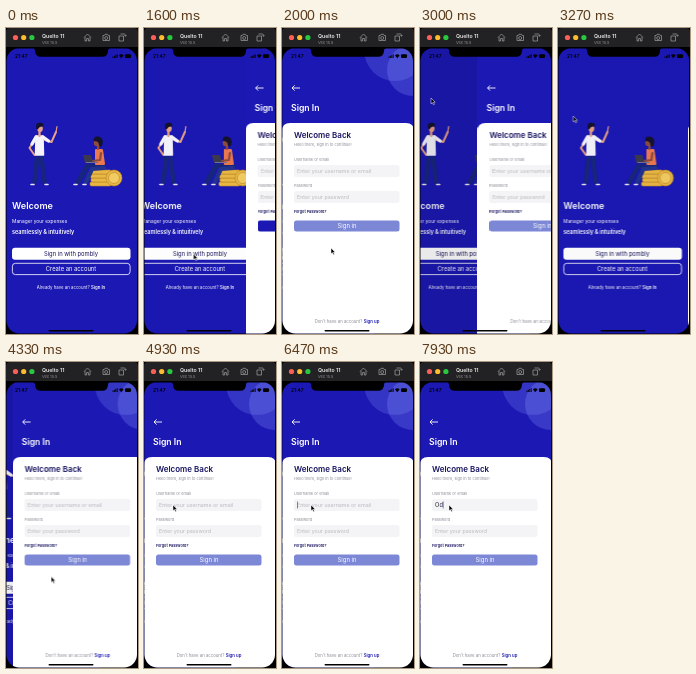
An HTML page for the animation above (8 s loop, 132 px wide and 306 px high).

```html
<!DOCTYPE html>
<html lang="en">
<head>
<meta charset="utf-8">
<title>Sign in flow</title>
<style>
  html, body { margin: 0; width: 100%; height: 100%; overflow: hidden; background: #000; }
  svg { display: block; width: 100vw; height: 100vh; font-family: Inter, "Liberation Sans", sans-serif; }
  .b { font-weight: 600; }
  .mid { text-anchor: middle; }
  .white { fill: #fff; }
  .navy { fill: #17145f; }
  .grey { fill: #8b8b96; }
  .hint { fill: #b9b9c0; font-size: 5.35px; }
  .label { fill: #8b8b96; font-size: 3.95px; }

  .welcome, .signin, .shade, .submit, .cursor, .hint-user, .typed, .caret {
    animation: 8s linear infinite;
  }
  .welcome { animation-name: parallax; }
  .signin { animation-name: push; }
  .shade { animation-name: shade; }
  .submit { animation-name: disable; }
  .cursor { animation-name: pointer; }
  .hint-user { animation-name: hint; animation-timing-function: step-end; }
  .typed { animation-name: typed; animation-timing-function: step-end; }
  .typed.second { animation-name: typed-second; }
  .caret { animation-name: caret; animation-timing-function: step-end; }

  @keyframes push {
    0%, 19.57%, 50.6% { transform: translateX(132px); animation-timing-function: cubic-bezier(.215, .61, .355, 1); }
    24.9%, 36.62% { transform: none; animation-timing-function: cubic-bezier(.215, .61, .355, 1); }
    42% { transform: translateX(132px); }
    56%, 100% { transform: none; }
  }
  @keyframes parallax {
    0%, 19.57%, 50.6% { transform: none; animation-timing-function: cubic-bezier(.215, .61, .355, 1); }
    24.9%, 36.62% { transform: translateX(-39.6px); animation-timing-function: cubic-bezier(.215, .61, .355, 1); }
    42% { transform: none; }
    56%, 100% { transform: translateX(-39.6px); }
  }
  @keyframes shade {
    0%, 19.57%, 42%, 50.6% { opacity: 0; }
    24.9%, 36.62%, 56%, 100% { opacity: .1; }
  }
  @keyframes disable {
    0%, 20.5%, 42%, 51.5% { fill: #1b18b3; }
    22%, 41.9%, 53%, 100% { fill: #7c88d5; }
  }
  @keyframes pointer {
    0%, 8% { transform: translate(86px, 310px); animation-timing-function: ease-in-out; }
    17%, 20% { transform: translate(49.5px, 226px); }
    25%, 28% { transform: translate(49px, 220px); animation-timing-function: ease-in-out; }
    34.5%, 36% { transform: translate(12px, 59px); }
    37.5%, 39% { transform: translate(11px, 70px); animation-timing-function: ease-in-out; }
    47%, 52% { transform: translate(48px, 227px); animation-timing-function: ease-in-out; }
    60%, 100% { transform: translate(29px, 143px); }
  }
  @keyframes hint { 0% { opacity: 1; } 93% { opacity: 0; } }
  @keyframes typed { 0% { opacity: 0; } 93% { opacity: 1; } }
  @keyframes typed-second { 0% { opacity: 0; } 96.5% { opacity: 1; } }
  @keyframes caret {
    0% { opacity: 0; transform: none; }
    65% { opacity: 1; transform: none; }
    71% { opacity: 0; transform: none; }
    77% { opacity: 1; transform: none; }
    83% { opacity: 0; transform: none; }
    89% { opacity: 1; transform: none; }
    93% { opacity: 1; transform: translateX(4.4px); }
    96.5% { opacity: 1; transform: translateX(7.7px); }
  }
</style>
</head>
<body>
<svg viewBox="0 0 132 306" preserveAspectRatio="none">
  <defs>
    <clipPath id="screen"><rect x=".5" y="20" width="130.5" height="285.5" rx="13"/></clipPath>
    <clipPath id="header"><rect y="18" width="132" height="90"/></clipPath>
  </defs>

  <g clip-path="url(#screen)">
    <g class="welcome">
      <rect y="18" width="132" height="288" fill="#1b18b3"/>

      <!-- standing man -->
      <g stroke-linecap="round" stroke-linejoin="round" fill="none">
        <path d="M31 130L28.5 154M35.5 130L38.5 154" stroke="#17267c" stroke-width="4.4"/>
        <path d="M28 156.5H25M39 156.5H42" stroke="#e9e5ee" stroke-width="1.6"/>
        <path d="M28 113L23.5 120L28.5 127" stroke="#e8a184" stroke-width="2"/>
        <path d="M39 112L45.5 114L50 104" stroke="#e8a184" stroke-width="2"/>
        <path d="M50 104L51 98.5" stroke="#e8a184" stroke-width="1.2"/>
        <path d="M30 109L26 116M37 109L42.5 113" stroke="#f4f2fa" stroke-width="3.4"/>
        <path d="M30 108H37L37.5 127H29.5Z" fill="#f4f2fa" stroke="#f4f2fa" stroke-width="1.5"/>
        <path d="M33.5 104V108" stroke="#e8a184" stroke-width="2.3"/>
      </g>
      <ellipse cx="34" cy="100.5" rx="2.8" ry="3.6" fill="#e8a184"/>
      <path d="M30.4 101Q29 94.5 33.5 94.7Q38.4 94.3 37.2 98.5Q33 98 32 101.5Z" fill="#12122a"/>

      <!-- coins -->
      <g fill="#e8b844" stroke="#bd8528" stroke-width=".6">
        <rect x="84" y="154" width="21" height="4" rx="1.4"/>
        <rect x="85" y="150" width="20" height="4" rx="1.4"/>
        <rect x="84" y="146" width="20" height="4" rx="1.4"/>
        <rect x="85" y="142" width="20" height="4" rx="1.4"/>
        <circle cx="108" cy="150" r="8"/>
        <circle cx="108" cy="150" r="5.5" fill="#f2cc62"/>
      </g>

      <!-- seated woman -->
      <g transform="translate(8 0)">
        <g stroke-linecap="round" stroke-linejoin="round" fill="none">
          <path d="M90 138L73 138L64 154" stroke="#17267c" stroke-width="4.6"/>
          <path d="M90 140L78 141L72 154" stroke="#22338f" stroke-width="4.2"/>
          <path d="M63 156.5H60M72 156.5H69" stroke="#e9e5ee" stroke-width="1.6"/>
          <path d="M82 122H88L90 136H82Z" fill="#eb7950" stroke="#eb7950" stroke-width="2"/>
          <path d="M87 125L86 132L78 133" stroke="#8e4c3c" stroke-width="2.2"/>
          <path d="M84 118V121" stroke="#8e4c3c" stroke-width="2.2"/>
        </g>
        <circle cx="83" cy="115" r="3.2" fill="#8e4c3c"/>
        <path d="M80 113Q79 108 84 108.5Q90 109.5 88.5 116Q87.5 121 85 117Q85 113 80 113Z" fill="#15122c"/>
        <path d="M69 127H77L79 135H71Z" fill="#3b3a4c"/>
        <path d="M72 134.5H84" stroke="#74728e"/>
      </g>

      <g class="white">
        <text class="b" x="6" y="181" font-size="9.1">Welcome</text>
        <text x="6" y="195" font-size="4.85">Manager your expenses</text>
        <text class="b" x="6" y="205.5" font-size="5.5">seamlessly &amp; intuitively</text>
        <rect x="6" y="219.7" width="118.5" height="12" rx="3"/>
        <text class="mid" x="65" y="228" font-size="5.85" fill="#15135a">Sign in with pombly</text>
        <rect x="6.4" y="235.3" width="117.7" height="11.3" rx="3" fill="none" stroke="#fff" stroke-width=".8"/>
        <text class="mid" x="65" y="243" font-size="5.8">Create an account</text>
        <text class="mid" x="65" y="260.5" font-size="4.35">Already have an account? <tspan class="b">Sign In</tspan></text>
      </g>
      <rect class="shade" y="18" width="132" height="288"/>
    </g>

    <g class="signin">
      <rect y="18" width="132" height="288" fill="#1b18b3"/>
      <g clip-path="url(#header)" fill="#8f9cff">
        <circle cx="113" cy="22" r="31" opacity=".22"/>
        <circle cx="131" cy="42" r="26" opacity=".25"/>
      </g>
      <path d="M18 60H10M12.6 57.4L10 60L12.6 62.6" fill="none" stroke="#fff" stroke-width=".9"/>
      <text class="b white" x="9" y="83" font-size="8.7">Sign In</text>
      <path d="M0 306V103Q0 95 8 95H124Q132 95 132 103V306Z" fill="#fff"/>

      <text class="b navy" x="12" y="110" font-size="8">Welcome Back</text>
      <text class="grey" x="12" y="118.3" font-size="3.95">Hello there, sign in to continue!</text>

      <text class="label" x="12" y="132.5">Username or email</text>
      <rect x="12" y="137" width="105.5" height="12" rx="2" fill="#f4f4f6"/>
      <text class="hint hint-user" x="15" y="145">Enter your username or email</text>
      <g font-size="5.6" fill="#25252d">
        <text class="typed" x="15" y="145">O</text>
        <text class="typed second" x="19.4" y="145">d</text>
      </g>
      <rect class="caret" x="15" y="139.5" width=".7" height="7" fill="#3c50d8"/>

      <text class="label" x="12" y="158.5">Password</text>
      <rect x="12" y="163" width="105.5" height="12" rx="2" fill="#f4f4f6"/>
      <text class="hint" x="15" y="171">Enter your password</text>
      <text class="b navy" x="12" y="184.7" font-size="3.75">Forgot Password?</text>

      <rect class="submit" x="12" y="192.5" width="105.5" height="11" rx="2.5"/>
      <text class="mid white" x="65" y="200.2" font-size="5.9">Sign in</text>
      <text class="mid grey" x="65" y="294.5" font-size="4.3">Don't have an account? <tspan class="b" fill="#1b18b3">Sign up</tspan></text>
    </g>

    <!-- status bar and home indicator -->
    <path d="M0 18H132V20.5H104Q102 20.5 102 22.5Q102 28.8 96 28.8H35Q29 28.8 29 22.5Q29 20.5 27 20.5H0Z"/>
    <text class="b" x="9" y="30" font-size="4.8">21:47</text>
    <path d="M107 30V28.5M108.4 30V27.8M109.8 30V27M111.2 30V26.2" stroke="#000" stroke-width=".9"/>
    <path d="M113 27.5Q115.3 25 117.6 27.5L115.3 30.2Z"/>
    <rect x="119" y="26.3" width="6" height="3.6" rx="1"/>
    <rect x="42.5" y="302" width="45" height="1.6" rx=".8"/>
  </g>

  <!-- window toolbar -->
  <path d="M0 19V4Q0 0 4 0H128Q132 0 132 4V19Z" fill="#222224"/>
  <circle cx="9.5" cy="9.5" r="2.6" fill="#fb5f57"/>
  <circle cx="17.7" cy="9.5" r="2.6" fill="#fdbc2e"/>
  <circle cx="25.9" cy="9.5" r="2.6" fill="#29c840"/>
  <text class="b" x="36" y="10" font-size="5.2" fill="#eee">Quelto 11</text>
  <text x="36" y="15.5" font-size="4" fill="#8f8f92">Vex 15.5</text>
  <g fill="none" stroke="#a3a3a6" stroke-width=".7">
    <path d="M78 9.5L81.5 6L85 9.5M79 9V13H80.6V10.5H82.4V13H84V9"/>
    <path d="M97 7.5H98.3L99 6.3H101.5L102.2 7.5H103.5V12.5H97Z"/>
    <circle cx="100.2" cy="10" r="1.5"/>
    <path d="M113 8H117.5V13H113ZM114.5 6H118.5Q119.5 6 119.5 8M118.5 7.3L119.5 8.4L120.5 7.3"/>
  </g>

  <g class="cursor">
    <path d="M0 0V5.8L1.4 4.6L2.4 6.8L3.4 6.3L2.4 4.2H4.2Z" fill="#000" stroke="#fff" stroke-width=".5"/>
  </g>
</svg>
</body>
</html>
```
